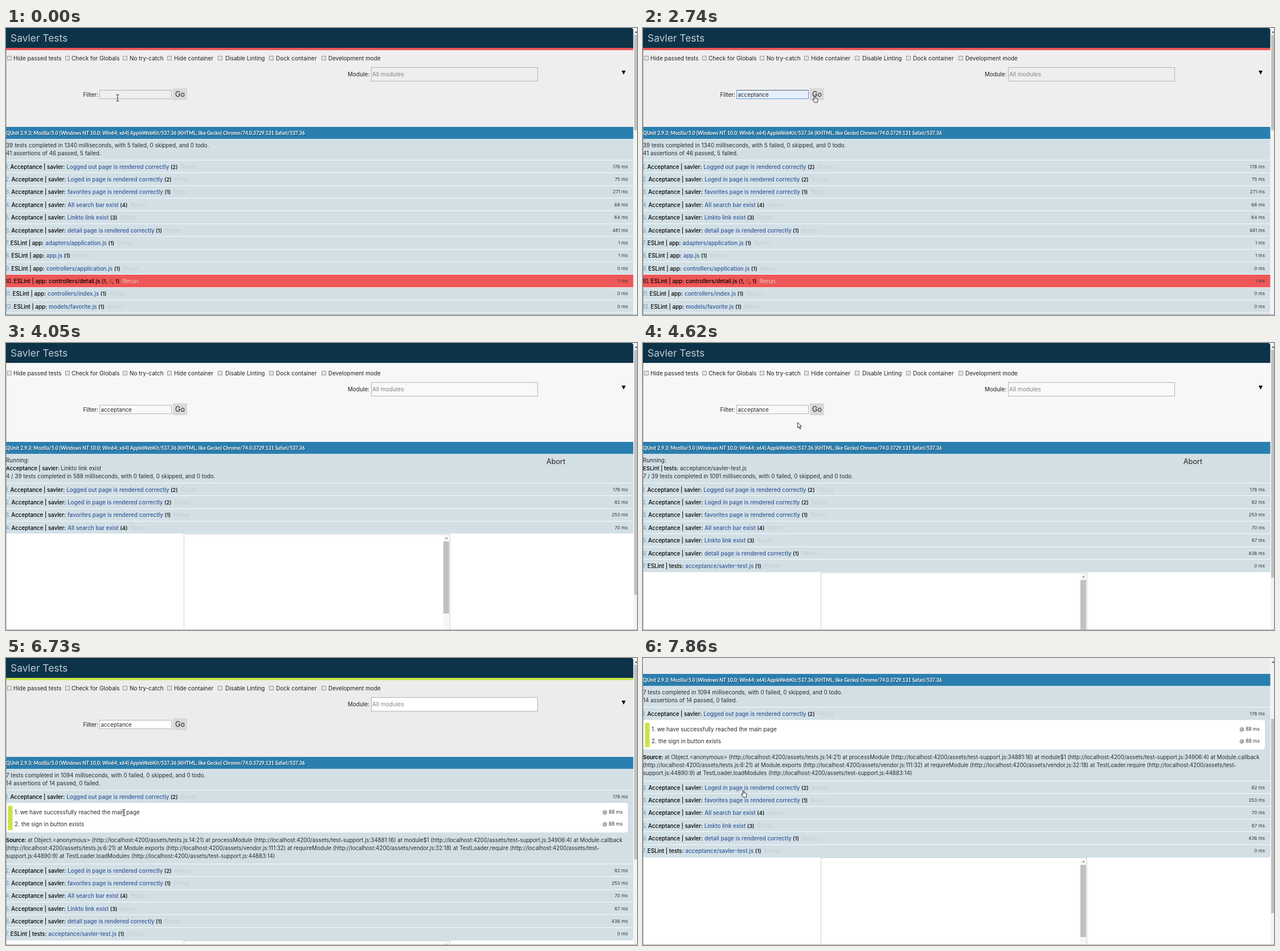
An HTML page with a canvas that plays this animation: 1108 px wide and 505 px high, repeating every 8000 ms.

```html
<!DOCTYPE html>
<html lang="en">
<head>
<meta charset="utf-8">
<title>Savler Tests</title>
<style>
html, body { margin: 0; width: 100%; height: 100%; overflow: hidden; background: #fff; }
canvas { display: block; }
</style>
</head>
<body>
<canvas width="1108" height="505"></canvas>
<script>
const c = document.querySelector('canvas').getContext('2d');
const LOOP = 8000, PAGE = 1101.5, ROW = 22.36, DETAILS = 107.5;
const SANS = 'Inter, sans-serif';
const ACC = 'Acceptance | savler:', APP = 'ESLint | app:';
const AGENT = 'QUnit 2.9.3; Mozilla/5.0 (Windows NT 10.0; Win64; x64) AppleWebKit/537.36 ' +
  '(KHTML, like Gecko) Chrome/74.0.3729.131 Safari/537.36';
const URL = '(http://localhost:4200/assets/';

const pages = [
  ['Logged out page is rendered correctly', 2],
  ['Loged in page is rendered correctly', 2],
  ['favorites page is rendered correctly', 1],
  ['All search bar exist', 4],
  ['Linkto link exist', 3],
  ['detail page is rendered correctly', 1]
];
const acceptance = times => pages.map(([name, count], i) => ({ mod: ACC, name, count, ms: times[i] }));
const lint = (name, ms, mod = APP, fail = false) => ({ mod, name, count: 1, ms, fail });

const allTests = [
  ...acceptance([178, 75, 271, 68, 64, 481]),
  lint('adapters/application.js', 1),
  lint('app.js', 1),
  lint('controllers/application.js', 0),
  lint('controllers/detail.js', 1, APP, true),
  lint('controllers/index.js', 0),
  lint('models/favorite.js', 0)
];
const filtered = [
  ...acceptance([178, 82, 253, 70, 67, 436]),
  lint('acceptance/savler-test.js', 0, 'ESLint | tests:')
];

// Key moments in ms
const FOCUS = 120, LIST_OPEN = 200, TYPE = 830, PICK = 1490, LIST_CLOSE = 2050;
const UNLOAD = 3240, LOAD = 3390, DONE = 4640, EXPAND = 6030;
const finished = [3620, 3700, 3950, 4040, 4200, 4600, 4620];

// Pointer: time, x, y, shape until the next key
const pointer = [
  [0, 196, 123, 'beam'], [120, 196, 123, 'beam'], [270, 201.5, 119.5, 'beam'], [540, 201.5, 119.5, ''],
  [1490, 215, 143, 'arrow'], [2050, 235, 148, 'arrow'], [2600, 302, 125, 'hand'],
  [3240, 302, 125, ''], [4420, 290, 132, 'arrow'], [5220, 227, 185, 'arrow'],
  [5370, 227, 185, 'arrow'], [5700, 153.5, 252, 'hand'], [6310, 153.5, 252, 'hand'],
  [6450, 170, 258, 'beam'], [6730, 207, 272, 'beam'], [6890, 207, 272, 'beam'],
  [7150, 222, 275, 'arrow'], [7320, 222, 275, 'arrow'], [7600, 200, 255, 'hand'],
  [7860, 177, 239, 'hand'], [8000, 177, 239, 'hand']
];

function box(x, y, w, h, fill, stroke) {
  if (fill) { c.fillStyle = fill; c.fillRect(x, y, w, h); }
  if (stroke) { c.strokeStyle = stroke; c.lineWidth = 1; c.strokeRect(x + .5, y + .5, w - 1, h - 1); }
}

function rounded(x, y, w, h, radii, fill) {
  c.fillStyle = fill;
  c.beginPath();
  c.roundRect(x, y, w, h, radii);
  c.fill();
}

// Draws text and returns where it ends
function text(s, x, y, color = '#2b2b2b', size = 9.8, weight = 400, align = 'left', family = SANS) {
  c.font = `${weight} ${size}px ${family}`;
  c.fillStyle = color;
  c.textAlign = align;
  c.fillText(s, x, y);
  return x + c.measureText(s).width;
}

function triangle(x, y, w, h, color) {
  c.fillStyle = color;
  c.beginPath();
  c.moveTo(x - w / 2, y + h / 2);
  c.lineTo(x + w / 2, y + h / 2);
  c.lineTo(x, y - h / 2);
  c.fill();
}

function header(banner) {
  rounded(0, 0, PAGE, 35, [0, 4, 0, 0], '#0d3349');
  text('Savler Tests', 8, 23.5, '#c2ccd1', 17.4);
  if (banner) box(0, 35, PAGE, 4, banner);
}

function toolbar(t, color, field) {
  box(0, 35, PAGE, 140, color);
  [[2, 13, 'Hide passed tests'], [104, 115, 'Check for Globals'], [205, 217, 'No try-catch'],
   [283, 295, 'Hide container'], [372, 385, 'Disable Linting'], [462, 474, 'Dock container'],
   [554, 566, 'Development mode']].forEach(([x, tx, label]) => {
    box(x, 49, 8, 8, '#e4e4e4', '#9a9a9a');
    text(label, tx, 57, '#222', 10);
  });
  text('Module:', 600, 85, '#222', 10);
  box(641, 69, 293, 25, field, '#b4b4b4');
  text('All modules', 643, 85, '#858585', 10.2);
  triangle(1084.5, 78.5, 7, -7, '#000');

  text('Filter:', 162, 121, '#222', 10, 400, 'right');
  const focused = t >= FOCUS && t < UNLOAD;
  const picked = t >= PICK;
  box(164, 109, 127, 16, focused ? (picked ? '#e8f0fe' : '#fff') : field, focused ? '#5f98e0' : '#b4b4b4');
  if (focused) box(165, 109, 125, 1, '#55606e');
  const typed = picked ? 10 : t < TYPE ? 0 : Math.min(4, 1 + Math.floor((t - TYPE) / 140));
  text('acceptance'.slice(0, typed), 166.5, 121);
  box(293, 106, 25, 21, '#d8d9d9');
  text('Go', 297, 121, '#222', 12.6);
  if (t >= LIST_OPEN && t < LIST_CLOSE) {
    box(165, 126, 141, 39, '#fff', '#c8c8c8');
    if (t >= TYPE) box(166, 135, 139, 21, '#eee');
    text('acceptance', 173, 149);
  }
}

function agentBar() {
  box(0, 174, PAGE, 21, '#2b7fb0');
  text(AGENT, 1, 189, 'rgba(0,0,0,.45)', 8.52, 700, 'left', 'Lato, sans-serif');
  text(AGENT, 0, 188, '#fff', 8.52, 700, 'left', 'Lato, sans-serif');
}

function block(y, bottom, color = '#d2e0e6', last = false) {
  rounded(0, y, PAGE, bottom - y, [0, 0, last ? 4 : 0, 0], color);
  if (!last) box(0, bottom - 1, PAGE, 1, 'rgba(255,255,255,.8)');
}

function summary(lines, height = 38) {
  block(195, 195 + height);
  lines.forEach((line, i) => text(line, 0, 210 + 14 * i));
}

function testRow(test, i, top, extra, last) {
  const y = Math.round(top + 14.7), fail = test.fail;
  block(Math.round(top), Math.round(top + ROW + extra), fail ? '#ee5757' : '#d2e0e6', last);
  let x = text(`${i + 1}.`, -1, y, fail ? '#000' : '#6d97c9', 10) + 1.5;
  x = text(test.mod, x, y, '#000', 9.75, 500) + 3;
  x = text(test.name, x, y, fail ? '#000' : '#36579a', 9.85, 500) + 2.5;
  if (fail) {
    x = text('(1, ', x, y, '#000', 9.4, 500);
    x = text('0', x, y, '#8d5a1c', 9.4, 500);
    x = text(', 1)', x, y, '#000', 9.4, 500);
  } else {
    x = text(`(${test.count})`, x, y, '#000', 9.4, 500);
  }
  text('Rerun', x + 5, y, fail ? '#e3c9cb' : '#c2ccd1', 10.2);
  text(`${test.ms} ms`, 1092, y - 1, '#333', 8.1, 400, 'right');
}

function details() {
  rounded(0, 255, 1092, 52, 4, '#fff');
  box(3.5, 260, 8, 43, '#c6e746');
  ['1. we have successfully reached the main page', '2. the sign in button exists'].forEach((s, i) => {
    text(s, 15, 275 + 21 * i, '#2b2b2b', 9.9);
    text('@ 88 ms', 1083, 274 + 21 * i, '#333', 8.5, 400, 'right');
  });
  const x = text('Source:', 0, 324, '#000', 9.5, 600) + 2.5;
  text(`at Object.<anonymous> ${URL}tests.js:14:21) at processModule ${URL}test-support.js:34881:16) ` +
    `at module$1 ${URL}test-support.js:34906:4) at Module.callback`, x, 324, '#2b2b2b', 9.67);
  text(`${URL}tests.js:6:21) at Module.exports ${URL}vendor.js:111:32) at requireModule ${URL}vendor.js:32:18) ` +
    `at TestLoader.require ${URL}test-`, 0, 338, '#2b2b2b', 9.67);
  text(`support.js:44890:9) at TestLoader.loadModules ${URL}test-support.js:44883:14)`, 0, 352, '#2b2b2b', 9.67);
}

function rows(tests, top, open, closing) {
  tests.forEach((test, i) => {
    const extra = open && i === 0 ? DETAILS : 0;
    testRow(test, i, top, extra, closing && i === tests.length - 1);
    top += ROW + extra;
  });
  if (open) details();
  return Math.round(top);
}

function container(y) {
  box(312, y, 468, 300, '#fff', '#d0d0d0');
  box(768, y + 1, 11, 298, '#f7f7f7');
  triangle(773.5, y + 7, 5, 3, '#8a8a8a');
  box(768, y + 13, 10, 127, '#c1c1c1');
}

function scrollbar(top, bottom) {
  box(1102, 0, 6, 505, '#f3f3f3');
  triangle(1106.5, 7, 5, 3, '#505050');
  box(1103, top, 5, bottom - top, '#c1c1c1');
}

function scrollAt(t) {
  if (t >= 7320) return 146;
  const p = Math.min(1, Math.max(0, (t - 6850) / 210));
  return Math.round(77 * p * p * (3 - 2 * p));
}

function page(t) {
  box(0, 0, 1108, 505, '#fff');
  if (t >= UNLOAD && t < LOAD) return;
  const scroll = scrollAt(t), open = t >= EXPAND;
  let thumbEnd;
  c.save();
  c.translate(0, -scroll);
  if (t < UNLOAD) {
    toolbar(t, '#eee', '#eee');
    header('#ee5757');
    summary(['39 tests completed in 1340 milliseconds, with 5 failed, 0 skipped, and 0 todo.',
      '41 assertions of 46 passed, 5 failed.']);
    box(0, rows(allTests, 233), PAGE, 9, '#d2e0e6');
    thumbEnd = 180;
  } else if (t < DONE) {
    const n = finished.filter(time => time <= t).length;
    const next = filtered[Math.min(n, 6)];
    const spent = filtered.slice(0, n).reduce((sum, test) => sum + test.ms, 5);
    toolbar(t, '#f7f7f7', '#f9f9f9');
    header();
    summary(['Running:', '',
      `${n} / 39 tests completed in ${spent} milliseconds, with 0 failed, 0 skipped, and 0 todo.`], 52);
    text(next.name, text(next.mod, 0, 224, '#000', 9.55, 500) + 2.5, 224);
    box(946, 199, 39, 19, '#d4dde1');
    text('Abort', 949, 213, '#222', 12.6);
    container(rows(filtered.slice(0, n), 247));
    thumbEnd = 483 - 10 * n;
  } else {
    toolbar(t, '#ececec', '#fff');
    header('#c6e746');
    summary(['7 tests completed in 1094 milliseconds, with 0 failed, 0 skipped, and 0 todo.',
      '14 assertions of 14 passed, 0 failed.']);
    container(rows(filtered, 233, open, true));
    thumbEnd = open ? 354 : 409;
  }
  agentBar();
  c.restore();
  const shift = Math.round(scroll * .65);
  scrollbar(12 + shift, thumbEnd + shift);
}

const shapes = {
  hand: new Path2D('M-1.5-5.5q1-1 2 0v4l3.5.8q1.3.5 1 2l-.8 4.7h-5l-3.5-5q.3-1.4 1.6-.8l1.2 1z'),
  arrow: new Path2D('M-2.5-5.5v9.5l2.2-2 1.7 4 1.6-.7-1.7-3.8h3z'),
  beam: new Path2D('M-2.5-5.5h2l.5.5.5-.5h2M0-5v10M-2.5 5.5h2l.5-.5.5.5h2')
};

function drawPointer(t) {
  const i = pointer.findIndex(key => key[0] > t);
  const [t0, x0, y0, shape] = pointer[i - 1], [t1, x1, y1] = pointer[i];
  if (!shape) return;
  const p = (t - t0) / (t1 - t0);
  c.save();
  c.translate(x0 + (x1 - x0) * p, y0 + (y1 - y0) * p);
  c.strokeStyle = '#111';
  c.lineWidth = .9;
  c.fillStyle = '#fff';
  if (shape !== 'beam') c.fill(shapes[shape]);
  c.stroke(shapes[shape]);
  c.restore();
}

function draw(now) {
  const t = now % LOOP;
  page(t);
  box(0, 35, 1, 470, 'rgba(130,130,130,.5)');
  box(0, 504, 1108, 1, '#b4b4b4');
  drawPointer(t);
  requestAnimationFrame(draw);
}
requestAnimationFrame(draw);
</script>
</body>
</html>
```
